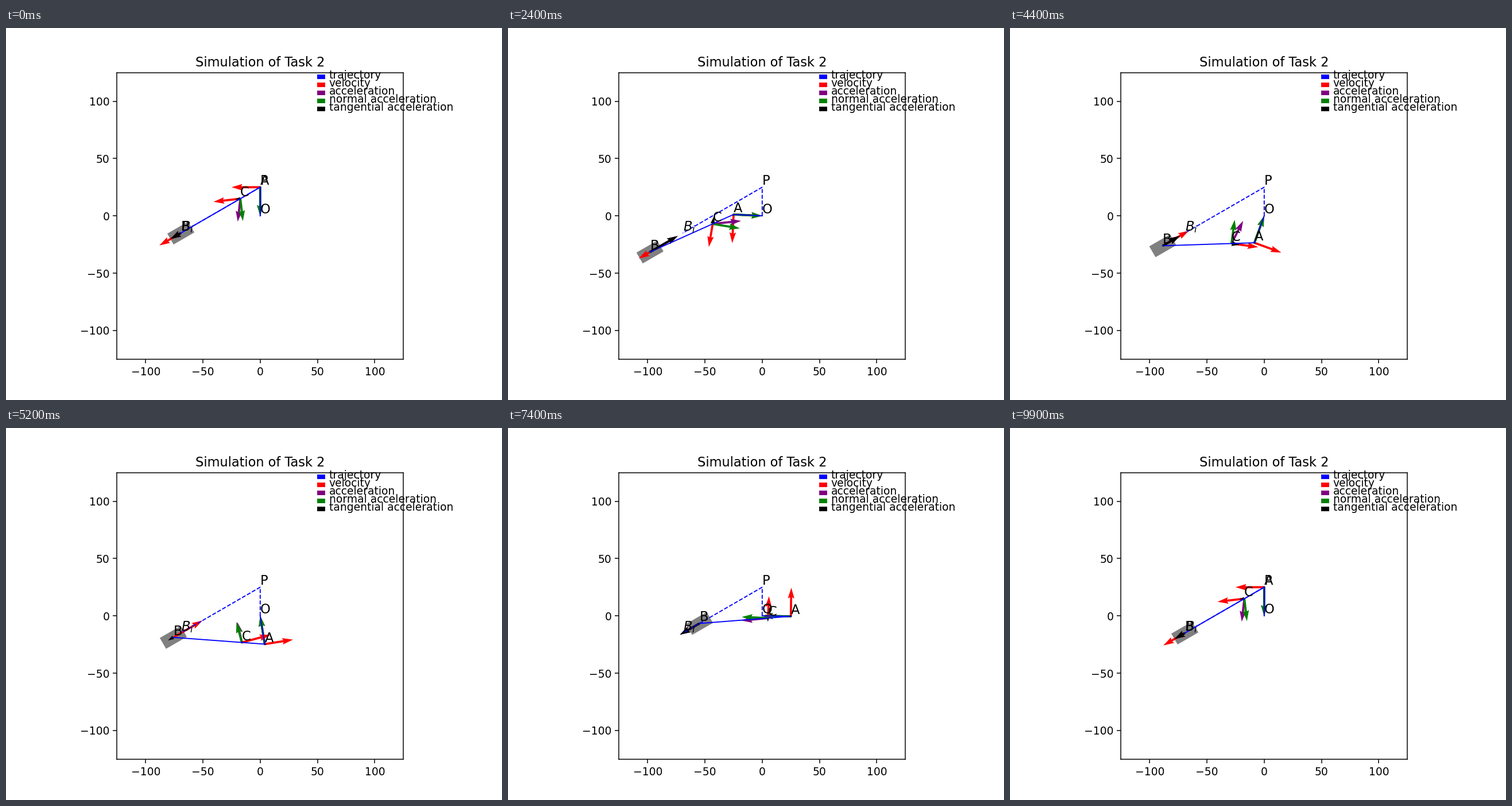
Write a matplotlib script that moves like this. It is 864 px wide and 648 px high and loops after 10 s.

```python
import numpy as np
import matplotlib.pyplot as plt
from matplotlib.animation import FuncAnimation
from matplotlib.patches import Rectangle

FRAMES = 100
R, ROD, AC = 25, 80, 20
O = np.zeros(2)
P = np.array([0.0, R])
U = -np.array([np.cos(np.pi / 6), np.sin(np.pi / 6)])  # slider axis
B_START = P + ROD * U
BOX_W, BOX_H = 20, 10
COLORS = ["red", "purple", "green", "black"]


def motion(t):
    """Position, velocity and acceleration of A, B and C at crank angle t."""
    a = R * np.array([-np.sin(t), np.cos(t)])
    va = R * np.array([-np.cos(t), -np.sin(t)])
    aa = -a

    along = (a - P) @ U
    s = along + np.sqrt(ROD**2 - (a - P) @ (a - P) + along**2)
    b = P + s * U
    rod = b - a
    vb = U * (rod @ va) / (rod @ U)
    dv = vb - va
    ab = U * (rod @ aa - dv @ dv) / (rod @ U)

    k = AC / ROD
    mix = lambda p, q: (1 - k) * p + k * q
    return {
        "A": (a, va, aa),
        "B": (b, vb, ab),
        "C": (mix(a, b), mix(va, vb), mix(aa, ab)),
    }


def label(pos, text):
    return ax.text(pos[0], pos[1] + 2, text, fontsize=12)


fig, ax = plt.subplots(figsize=(6.4, 4.8), dpi=135)
ax.set_aspect("equal")
ax.set_xlim(-125, 125)
ax.set_ylim(-125, 125)
ax.set_xticks(range(-100, 101, 50))
ax.set_yticks(range(-100, 101, 50))
ax.set_title("Simulation of Task 2")

legend = ["trajectory", "velocity", "acceleration",
          "normal acceleration", "tangential acceleration"]
for i, (name, color) in enumerate(zip(legend, ["blue"] + COLORS)):
    y = 120 - 7 * i
    ax.add_patch(Rectangle((50, y), 6, 3, color=color))
    ax.text(60, y, name, fontsize=10)

box = ax.add_patch(Rectangle((0, 0), BOX_W, BOX_H, angle=30,
                             rotation_point="center", color="gray"))
arrows = {
    n: [ax.quiver(0, 0, 1, 0, color=c, angles="uv", scale_units="xy", scale=1)
        for c in COLORS]
    for n in "ABC"
}
ax.plot(*np.array([O, P, B_START]).T, "b--", lw=1)
links, = ax.plot([], [], "b-", lw=1)

label(O, "O")
label(P, "P")
label(B_START, "$B_i$")
names = {n: label(O, n) for n in "ABC"}


def update(i):
    state = motion(2 * np.pi * i / (FRAMES - 1))
    for n, (pos, vel, acc) in state.items():
        # B only ever moves along the slider axis
        d = U if n == "B" else vel / np.hypot(*vel)
        tang = (acc @ d) * d
        for q, vec in zip(arrows[n], (vel, acc, acc - tang, tang)):
            q.set_offsets([pos])
            q.set_UVC(vec[:1], vec[1:])
        names[n].set_position((pos[0], pos[1] + 2))

    a, b = state["A"][0], state["B"][0]
    links.set_data(*np.array([O, a, b]).T)
    box.set_xy((b[0] - BOX_W / 2, b[1] - BOX_H / 2))
    return []


anim = FuncAnimation(fig, update, frames=FRAMES, interval=100,
                     repeat=True, repeat_delay=0)
plt.show()
```
